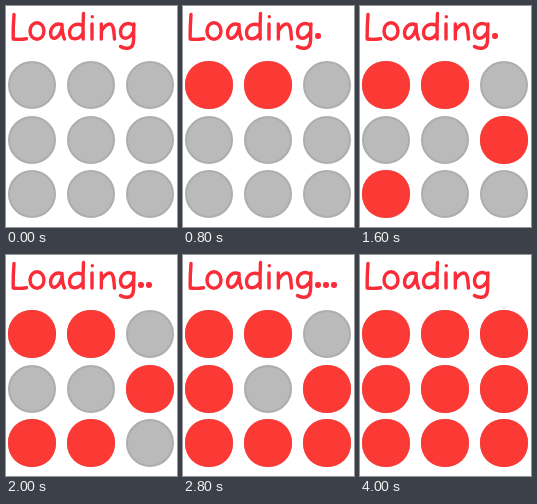
An HTML page for the animation above (4.4 s loop, 171x221 px).

```html
<!DOCTYPE html>
<html lang="en">
<head>
<meta charset="utf-8">
<title>Loading</title>
<style>
  @property --step { syntax: "<integer>"; inherits: true; initial-value: 0; }

  html, body { margin: 0; width: 100%; height: 100%; overflow: hidden; background: #fff; }
  svg { display: block; width: 100vw; height: 100vh; animation: count 4400ms steps(11, end) infinite; }

  /* one step every 400 ms, 0 to 10 */
  @keyframes count { from { --step: 0; } to { --step: 11; } }

  .off { fill: #bababa; stroke: #adadad; stroke-width: 2; }
  .on { fill: #fb3935; opacity: calc(var(--step) - var(--from) + 1); }
  .word { fill: none; stroke: #fa2c37; stroke-width: 3.4; stroke-linecap: round; stroke-linejoin: round; }
  .dot { fill: #fa2c37; opacity: min(var(--step) - var(--from) + 1, var(--to) - var(--step)); }
</style>
</head>
<body>
<svg viewBox="0 0 171 221" role="img" aria-label="Loading">
  <defs>
    <circle id="disc" r="23"/>
    <rect id="lit" x="-24" y="-24" width="48" height="48" rx="23"/>
    <rect id="point" x="-3" y="-3" width="6" height="6" rx="2.4"/>
    <g id="row">
      <use href="#disc" x="26"/>
      <use href="#disc" x="85"/>
      <use href="#disc" x="144"/>
    </g>
  </defs>

  <g class="word">
    <path d="M8 8.5Q7 21 7.2 33Q13 33.8 20.5 32.8"/>
    <ellipse cx="31" cy="25" rx="7" ry="8.2"/>
    <path d="M56 18.8C49 16 44.5 22 44.5 27.5C45 35 53 34 56 22M56 18.5Q56 28 58.5 33"/>
    <path d="M76.5 19.5C69 16 63.5 21 63.5 27C64 35 73 34.5 77 27M77.5 7.5Q76.8 20 77.2 33"/>
    <path d="M86 18V33M86.3 10.6v.2"/>
    <path d="M95.3 18Q95.5 25 95.3 33M95.5 25C98 20 102 17 105 18.3C108 20 107.8 26 108.5 33"/>
    <path d="M127 19C120 15 114.5 20 114.5 26C115 34.5 123 34 127.2 26M128 18C127 26 128.5 32 127 38C125.5 43.5 118 43 114.5 40.5"/>
  </g>

  <use class="dot" href="#point" x="135" y="30" style="--from:2;--to:10"/>
  <use class="dot" href="#point" x="143" y="30" style="--from:5;--to:9"/>
  <use class="dot" href="#point" x="151" y="30" style="--from:6;--to:8"/>

  <g class="off">
    <use href="#row" y="79"/>
    <use href="#row" y="134"/>
    <use href="#row" y="188"/>
  </g>

  <use class="on" href="#lit" x="26" y="79" style="--from:1"/>
  <use class="on" href="#lit" x="85" y="79" style="--from:2"/>
  <use class="on" href="#lit" x="144" y="79" style="--from:8"/>
  <use class="on" href="#lit" x="26" y="134" style="--from:7"/>
  <use class="on" href="#lit" x="85" y="134" style="--from:9"/>
  <use class="on" href="#lit" x="144" y="134" style="--from:4"/>
  <use class="on" href="#lit" x="26" y="188" style="--from:3"/>
  <use class="on" href="#lit" x="85" y="188" style="--from:5"/>
  <use class="on" href="#lit" x="144" y="188" style="--from:6"/>
</svg>
</body>
</html>
```
